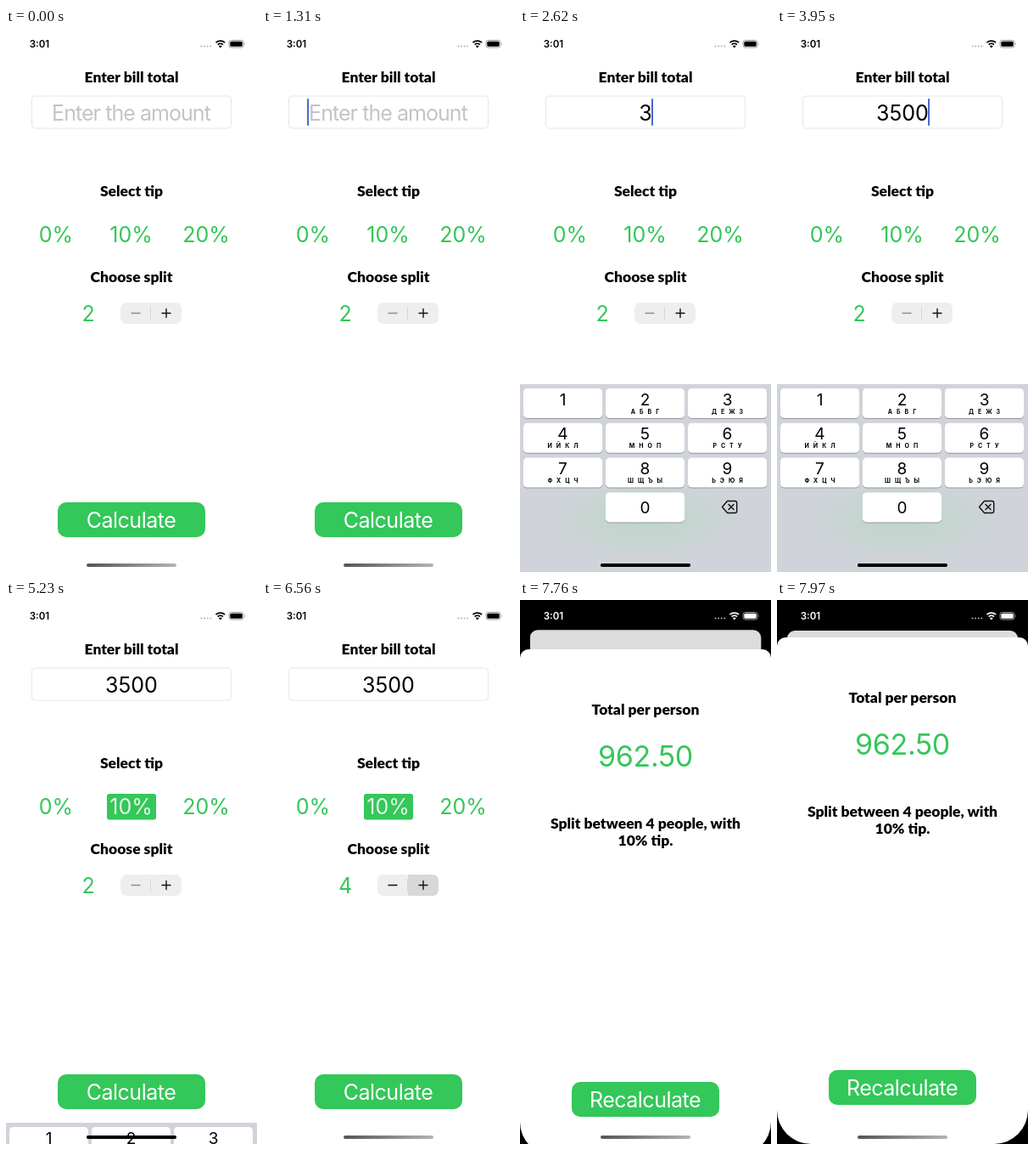
These frames come from a looping animation (296x640 px, 8 s). An HTML page:

```html
<!DOCTYPE html>
<html lang="en">
<head>
<meta charset="utf-8">
<title>Bill splitter</title>
<style>
html, body { margin: 0; width: 100%; height: 100%; overflow: hidden; background: #000; }
svg { display: block; width: 296px; height: 640px; }
text { font-family: Inter, Roboto, sans-serif; font-size: 25px; text-anchor: middle; }
.label { font: 900 17.5px "Marker Felt", Lato, sans-serif; }
.green { fill: #34c759; }
.hint { fill: #c4c4c6; letter-spacing: -.038em; }
.btn { fill: #fff; letter-spacing: -.02em; }
.sum { font-size: 34px; letter-spacing: -.01em; }
.time { font-size: 11.5px; font-weight: 600; }
.digit { font-size: 19px; }
.abc { font-size: 7px; font-weight: 700; letter-spacing: 5px; }
.line { fill: none; stroke-width: 1.4; stroke-linecap: round; stroke-linejoin: round; }

/* One 8 s loop, every change held until the next: 1% = 80 ms */
.a { animation: 8s step-end infinite; }

#page { animation-name: page; transform-origin: 148px 0; }
@keyframes page {
  0% { transform: none; }
  94.25% { transform: translateY(17px) scale(.9617); }
  95.625% { transform: translateY(31.5px) scale(.929); }
  97% { transform: translateY(35.2px) scale(.921); }
  98.375%, 100% { transform: translateY(36px) scale(.919); }
}
.card { animation-name: card; }
@keyframes card {
  0% { rx: 0; }
  94.25% { rx: 20px; }
  95.625% { rx: 13px; }
  97%, 100% { rx: 10px; }
}
#dim { animation-name: dim; }
@keyframes dim {
  0% { opacity: 0; }
  94.25% { opacity: .06; }
  95.625% { opacity: .12; }
  97%, 100% { opacity: .14; }
}
#sheet { animation-name: sheet; }
@keyframes sheet {
  0% { transform: translateY(600px); }
  94.25% { transform: translateY(314px); }
  95.625% { transform: translateY(75px); }
  97% { transform: translateY(14px); }
  98.375% { transform: translateY(3px); }
  99.625%, 100% { transform: none; }
}
#pad { animation-name: pad; }
@keyframes pad {
  0% { transform: translateY(222px); }
  17.875% { transform: translateY(206px); }
  19.25% { transform: translateY(74px); }
  20.625% { transform: translateY(15px); }
  22% { transform: translateY(4px); }
  23.375% { transform: translateY(1px); }
  25% { transform: none; }
  63.875% { transform: translateY(95px); }
  65.375% { transform: translateY(196px); }
  66.75% { transform: translateY(216px); }
  68.125%, 100% { transform: translateY(222px); }
}
#key3 { animation-name: press; }
@keyframes press {
  0% { fill: #fff; }
  28.5% { fill: #b8bcc5; }
  31.25% { fill: #dcdee2; }
  32.75%, 100% { fill: #fff; }
}
#caret { animation-name: caret; }
@keyframes caret {
  0% { opacity: 0; transform: translateX(52px); }
  16.375% { opacity: 1; transform: translateX(52px); }
  29.875% { opacity: 1; transform: translateX(155px); }
  42% { opacity: 1; transform: translateX(163px); }
  47.5% { opacity: 1; transform: translateX(171px); }
  49.375% { opacity: 1; transform: translateX(178px); }
  57%, 100% { opacity: 0; transform: translateX(178px); }
}
#hint { animation-name: hint; }
@keyframes hint { 0% { opacity: 1; } 29.875%, 100% { opacity: 0; } }
#n1 { animation-name: n1; }
@keyframes n1 { 0% { opacity: 0; } 29.875% { opacity: 1; } 42%, 100% { opacity: 0; } }
#n2 { animation-name: n2; }
@keyframes n2 { 0% { opacity: 0; } 42% { opacity: 1; } 47.5%, 100% { opacity: 0; } }
#n3 { animation-name: n3; }
@keyframes n3 { 0% { opacity: 0; } 47.5% { opacity: 1; } 49.375%, 100% { opacity: 0; } }
#n4 { animation-name: n4; }
@keyframes n4 { 0% { opacity: 0; } 49.375%, 100% { opacity: 1; } }

#chip { animation-name: chip; }
@keyframes chip {
  0% { fill: transparent; }
  61.125% { fill: #34c759; }
  94.25%, 100% { fill: #70b985; }
}
#tip { animation-name: tip; }
@keyframes tip { 0% { fill: #34c759; } 61.125%, 100% { fill: #e2f6e7; } }

#s2 { animation-name: s2; }
@keyframes s2 { 0% { opacity: 1; } 75.125%, 100% { opacity: 0; } }
#s3 { animation-name: s3; }
@keyframes s3 { 0% { opacity: 0; } 75.125% { opacity: 1; } 82%, 100% { opacity: 0; } }
#s4 { animation-name: s4; }
@keyframes s4 { 0% { opacity: 0; } 82%, 100% { opacity: 1; } }
#plus { animation-name: plus; }
@keyframes plus {
  0% { opacity: 0; }
  75.125% { opacity: 1; }
  78.125% { opacity: 0; }
  82% { opacity: 1; }
  83.375%, 100% { opacity: 0; }
}
#minus { animation-name: minus; }
@keyframes minus { 0% { stroke: #8e8e91; } 75.125%, 100% { stroke: #111; } }

#calc { animation-name: calc; }
@keyframes calc { 0% { opacity: 1; } 91.625% { opacity: .5; } 94.25%, 100% { opacity: 1; } }
#status { animation-name: status; }
@keyframes status { 0% { color: #000; } 97%, 100% { color: #fff; } }
#bar { animation-name: bar; }
@keyframes bar { 0% { opacity: 0; } 17.875% { opacity: 1; } 69.5%, 100% { opacity: 0; } }
</style>
</head>
<body>
<svg viewBox="0 0 296 640">
  <defs>
    <linearGradient id="grey">
      <stop offset="0" stop-color="#555"/>
      <stop offset="1" stop-color="#b4b4b4"/>
    </linearGradient>
    <radialGradient id="glow">
      <stop offset="0" stop-color="#b9d8c4" stop-opacity=".75"/>
      <stop offset=".5" stop-color="#bdd6c8" stop-opacity=".5"/>
      <stop offset="1" stop-color="#d0d3d9" stop-opacity="0"/>
    </radialGradient>
  </defs>

  <g id="page" class="a">
    <rect class="card a" width="296" height="640" fill="#fff"/>
    <text class="label" x="148" y="64">Enter bill total</text>
    <rect x="30.5" y="80" width="235" height="38" rx="4" fill="#fff" stroke="#e6e6e8"/>
    <text id="hint" class="hint a" x="147.5" y="109">Enter the amount</text>
    <text id="n1" class="a" x="148" y="109">3</text>
    <text id="n2" class="a" x="148" y="109">35</text>
    <text id="n3" class="a" x="148" y="109">350</text>
    <text id="n4" class="a" x="148" y="109">3500</text>
    <rect id="caret" class="a" y="83" width="2" height="32" rx="1" fill="#4868d0"/>

    <text class="label" x="148" y="198">Select tip</text>
    <rect id="chip" class="a" x="119" y="228" width="58" height="30.5" rx="3"/>
    <text class="green" x="59" y="252">0%</text>
    <text id="tip" class="a" x="147.5" y="252">10%</text>
    <text class="green" x="236" y="252">20%</text>

    <text class="label" x="148" y="299">Choose split</text>
    <g class="green">
      <text id="s2" class="a" x="97" y="345">2</text>
      <text id="s3" class="a" x="97" y="345">3</text>
      <text id="s4" class="a" x="97" y="345">4</text>
    </g>
    <rect x="135" y="323" width="72" height="25" rx="7" fill="#eeeeef"/>
    <path id="plus" class="a" d="M171 323h29a7 7 0 0 1 7 7v11a7 7 0 0 1-7 7h-29z" fill="#d8d8da"/>
    <path d="M170.5 328v15" stroke="#d6d6d8"/>
    <path id="minus" class="line a" d="M148 335.5h10"/>
    <path class="line" d="M184 335.5h10m-5-5v10" stroke="#111"/>

    <rect class="green" x="61" y="558" width="174" height="41" rx="10"/>
    <text id="calc" class="btn a" x="147.5" y="588">Calculate</text>
    <rect id="dim" class="card a" width="296" height="640" style="animation-name: dim, card"/>
  </g>

  <g id="pad" class="a">
    <rect y="419" width="296" height="221" fill="#d0d3d9"/>
    <ellipse cx="148" cy="579" rx="135" ry="55" fill="url(#glow)"/>
    <g id="keys"></g>
    <path class="line" d="M244.5 570.5l-6-7 6-7h9a2.2 2.2 0 0 1 2.2 2.2v9.6a2.2 2.2 0 0 1-2.2 2.2zM246 560.5l6 6m0-6l-6 6" stroke="#111"/>
  </g>

  <g id="sheet" class="a">
    <path d="M0 54a10 10 0 0 1 10-10h276a10 10 0 0 1 10 10V600a40 40 0 0 1-40 40H40a40 40 0 0 1-40-40z" fill="#fff"/>
    <text class="label" x="148" y="120.5">Total per person</text>
    <text class="sum green" x="148" y="181.5">962.50</text>
    <text class="label" x="148" y="255">Split between 4 people, with</text>
    <text class="label" x="148" y="275">10% tip.</text>
    <rect class="green" x="61" y="553" width="174" height="41" rx="10"/>
    <text class="btn" x="147.5" y="583">Recalculate</text>
  </g>

  <g id="status" class="a" fill="currentColor">
    <text class="time" x="39.5" y="23">3:01</text>
    <path d="M230.5 21.5h12" stroke="#b0b0b3" stroke-width="2" stroke-linecap="round" stroke-dasharray="0 3.6"/>
    <path d="M247.5 17.2a7.6 7.6 0 0 1 10.6 0M249.7 19.6a4.5 4.5 0 0 1 6.2 0" fill="none" stroke="currentColor" stroke-width="1.8"/>
    <path d="M252.8 23.4l-2-2.1a3 3 0 0 1 4 0z"/>
    <rect x="263" y="14.5" width="17" height="8.5" rx="2.6" fill="none" stroke="#98989b"/>
    <rect x="264.3" y="15.8" width="14.4" height="5.9" rx="1.5"/>
    <path d="M281.2 17.2q1.4 1.5 0 3z" fill="#98989b"/>
  </g>

  <rect x="95" y="630" width="106" height="4" rx="2" fill="url(#grey)"/>
  <rect id="bar" class="a" x="95" y="630" width="106" height="4" rx="2"/>
</svg>
<script>
const letters = ["", "АБВГ", "ДЕЖЗ", "ИЙКЛ", "МНОП", "РСТУ", "ФХЦЧ", "ШЩЪЫ", "ЬЭЮЯ"];

function key(digit, col, row, abc) {
  const x = 4 + col * 97, y = 424 + row * 40.8, mid = x + 46.5;
  const box = `x="${x}" width="93" height="35" rx="4.5"`;
  return `<rect ${box} y="${y + 1}" fill="#95989e"/>
    <rect ${box} y="${y}" id="key${digit}" class="a" fill="#fff"/>
    <text class="digit" x="${mid}" y="${y + (digit ? 19.5 : 24.5)}">${digit}</text>
    <text class="abc" x="${mid + 2.5}" y="${y + 29.5}">${abc}</text>`;
}

document.getElementById("keys").innerHTML =
  letters.map((abc, i) => key(i + 1, i % 3, Math.floor(i / 3), abc)).join("") + key(0, 1, 3, "");
</script>
</body>
</html>
```
